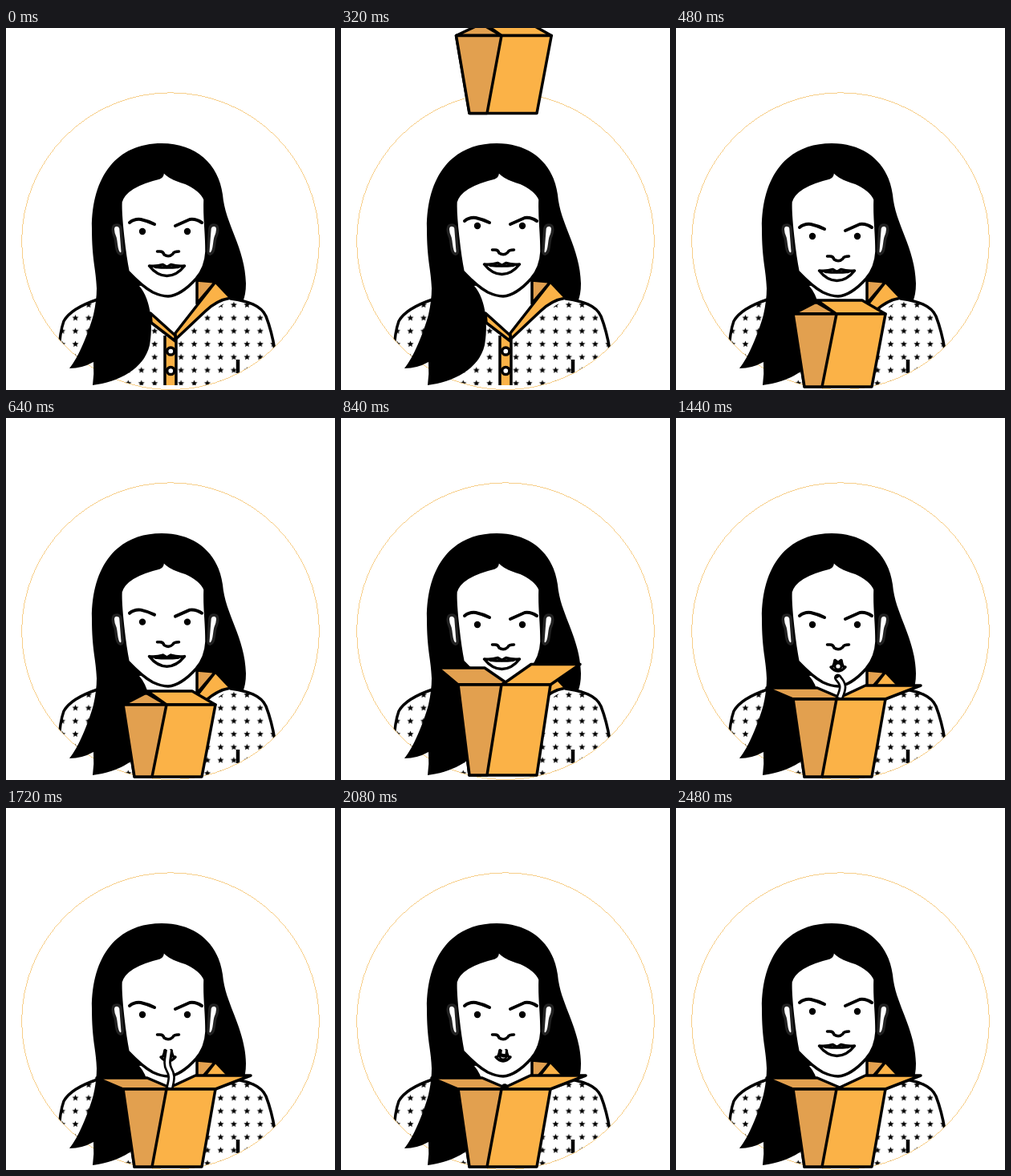
An HTML page that plays this animation: 410 px wide and 452 px high, repeating every 3.32 s.

```html
<!DOCTYPE html>
<html lang="en">
<head>
<meta charset="utf-8">
<title>Noodle box</title>
<style>
  html, body { margin: 0; width: 100%; height: 100%; overflow: hidden; background: #fff; }
  svg { display: block; width: 100%; height: 100%; }
  .ln { fill: none; stroke: #000; stroke-width: 3.5; stroke-linecap: round; stroke-linejoin: round; }
  .light { fill: #fbb247; }
  .dark { fill: #e2a04f; }
  .white { fill: #fff; }
</style>
</head>
<body>
<svg viewBox="0 0 410 452">
  <defs>
    <pattern id="stars" x="78.3" y="337.4" width="16.45" height="16.3" patternUnits="userSpaceOnUse">
      <path d="M8.2 4.2l1.1 2.7 2.9.2-2.2 1.9.7 2.8-2.5-1.5-2.5 1.5.7-2.8-2.2-1.9 2.9-.2z"/>
    </pattern>
    <clipPath id="disc"><circle cx="205" cy="266.2" r="185"/></clipPath>
    <clipPath id="gap"><rect x="185" y="302" width="35" height="47.5"/></clipPath>
  </defs>

  <circle cx="205" cy="266.2" r="185.4" fill="none" stroke="#f2ae3a" stroke-width=".6" shape-rendering="crispEdges"/>

  <!-- shirt -->
  <g clip-path="url(#disc)">
    <path fill="url(#stars)" d="M67 402Q67 380 72 366Q81 350 112 339L180 350L211 385L280 338C301 341 318 346 324 360Q331 378 335 402V446H67Z"/>
    <path class="ln" d="M66 404Q67 380 72 366Q81 350 114 339M280 338C301 341 318 346 324 360Q331 378 335 402"/>
    <path d="M289 414V431" stroke="#000" stroke-width="4.5"/>
    <path class="light" d="M198 386H212V446H198Z"/>
    <path class="ln" style="stroke-linecap:butt" d="M198 384V446M212 386V446"/>
    <g class="ln white"><circle cx="205.3" cy="403.5" r="4.6"/><circle cx="205.3" cy="428" r="4.6"/></g>
  </g>
  <path class="white" d="M160 325L238 314V344L211 383L176 352Z"/>

  <!-- hair and collar -->
  <path d="M194 144C237 144 265 170 270 208C273 245 298 274 299 319Q299 333 295 342Q288 337 280 338L261 317L238 314L202 320L166 322C182 340 183 375 179 396C172 426 140 442 108 446Q110 432 109 417Q95 425 79 425C90 412 103 380 109 358Q113 340 113 325C112 300 107 290 107 250C107 185 138 144 194 144Z"/>
  <g class="ln">
    <path class="dark" d="M238 315L261 317L238 344Z"/>
    <path class="light" d="M261 317L280 337Q262 340 248 354L211 389V381Z"/>
    <path class="light" d="M180 356L211 384V391L181 368Z"/>
  </g>

  <!-- head -->
  <path class="ln white" d="M193 175Q198 184 191 187C166 193 147 203 143 217C142 236 148 285 152 304Q170 323 183 330Q194 335 202 335Q218 334 237 313Q249 299 250 279C250 250 247 240 248 214Q243 202 223 193Q213 190 209 188Q200 184 193 175Z"/>
  <g class="ln white" style="stroke:#222">
    <path id="ear" d="M138 246C131 246 133 255 136 262C138 270 137 280 142 282Q146 283 145 276L143 250Q142 246 138 246Z"/>
    <use href="#ear" transform="matrix(-1 0 0 1 397 0)"/>
  </g>

  <g id="brows" class="ln" style="stroke-width:4">
    <path d="M154 243Q160 238 168 239Q177 241 185 245M211 247L229 239Q237 238 244 243"/>
  </g>
  <g id="eyes"><circle cx="170" cy="254" r="4.2"/><circle cx="226" cy="254" r="4.2"/></g>
  <g id="low" class="ln">
    <path d="M188.500 279H192Q196 279 197 283Q203 287 208 282Q209 279 215.500 279"/>
    <path id="lips" class="white"/>
    <ellipse id="inner" class="white" stroke-width="2.8"/>
  </g>

  <g id="box" class="ln">
    <path id="flapL" class="dark"/>
    <path id="flapR" class="light"/>
    <g id="noodle" clip-path="url(#gap)">
      <path pathLength="100" style="stroke-width:9.5"/>
      <path pathLength="100" style="stroke:#fff;stroke-width:4.2;stroke-linecap:butt"/>
    </g>
    <path id="front" class="light"/>
    <path id="side" class="dark"/>
  </g>
</svg>

<script>
const LOOP = 3320, STEP = 40;
const LAND = 440;
const $ = id => document.getElementById(id);
const strands = [...$('noodle').children];

const mix = (a, b, p) => a + (b - a) * p;
const ramp = (t, a, b) => Math.min(1, Math.max(0, (t - a) / (b - a)));
const ease = (t, a, b) => { const p = ramp(t, a, b); return p * p * (3 - 2 * p); };
const bump = (t, a, b) => Math.sin(Math.PI * ramp(t, a, b));

const attrs = (el, o) => Object.entries(o).forEach(([k, v]) => el.setAttribute(k, v));
const shift = (id, y) => attrs($(id), { transform: `translate(0 ${y})` });
const poly = (id, ...pts) => attrs($(id), { d: `M${pts.join('L')}Z` });

// o goes from smile (0) to pout (1)
function drawMouth(o) {
  const x = mix(200.5, 202, o), w = mix(22, 9, o), cupid = mix(5, 4, o);
  const corner = mix(297, 307, o), top = mix(295.5, 298.5, o), low = mix(309.5, 312, o);
  const half = s => `${x + s * w * .6} ${corner + 1}`;
  attrs($('lips'), {
    d: `M${x - w} ${corner}Q${half(-1)} ${x - cupid} ${top}L${x} ${top + 3}L${x + cupid} ${top}` +
       `Q${half(1)} ${x + w} ${corner}Q${x + w * .55} ${low} ${x} ${low}Q${x - w * .55} ${low} ${x - w} ${corner}Z`
  });
  attrs($('inner'), { cx: x, cy: mix(299, 306, o), rx: mix(15, 4, o), ry: mix(.4, 4, o) });
}

function drawFace(t) {
  const up = ease(t, 40, 280) - ease(t, 360, LAND);
  const down = 6 * bump(t, 400, 560) + 4 * (ease(t, 600, 760) - ease(t, 2240, 2480));
  shift('brows', down - 2 * up);
  shift('eyes', down - 7 * up);
  shift('low', down - 2 * up);
  drawMouth(ease(t, 840, 1000) - ease(t, 2240, 2480));
}

function drawBox(t) {
  $('box').style.display = t < 200 ? 'none' : '';
  // free fall, squash on landing, then crouch and hop while the flaps open
  const hop = bump(t, 720, 960);
  const fall = Math.min(448, .00795 * Math.max(0, t - 200) ** 2 - 8);
  const base = fall - 2 * hop;
  const rim = fall - 97 + 7 * bump(t, LAND, 560) + 8 * bump(t, 600, 720) - 18 * hop;
  const wide = 2.5 * (1 - ramp(t, 400, 480));
  const l = [146 - wide, rim], m = [200, rim], r = [261 + wide / 2, rim];

  const p = ease(t, 660, 820);
  const tip = (shut, open, rise, tilt) => [mix(shut, open, p) + tilt * hop, rim - rise * (1 + .5 * hop)];
  const v = tip(200, 204, 2 * p, 1);
  poly('flapL', l, tip(173, 113, 14, 8), tip(176, 176, 14, 3), v, m);
  poly('flapR', m, v, tip(176, 236, 17, 1), tip(232, 305, 17, -7), r);
  poly('front', l, r, [244, base], [160, base]);
  poly('side', l, m, [182, base], [160, base]);
}

function drawNoodle(t) {
  $('noodle').style.display = t >= 1160 && t < 2120 ? '' : 'none';
  const head = 100 * ramp(t, 1160, 1680), tail = 100 * ramp(t, 1720, 2120);
  const s = 2 * Math.sin((t - 1720) / 60);
  strands.forEach(p => attrs(p, {
    d: `M204 349C${207 + s} 337 ${207 + s} 333 203 326C${199 - s} 319 202 312 203 302`,
    'stroke-dasharray': `0 ${tail} ${head - tail} 200`
  }));
}

const start = performance.now();
function tick() {
  const t = Math.floor((performance.now() - start) % LOOP / STEP) * STEP;
  drawFace(t);
  drawBox(t);
  drawNoodle(t);
  requestAnimationFrame(tick);
}
tick();
</script>
</body>
</html>
```
